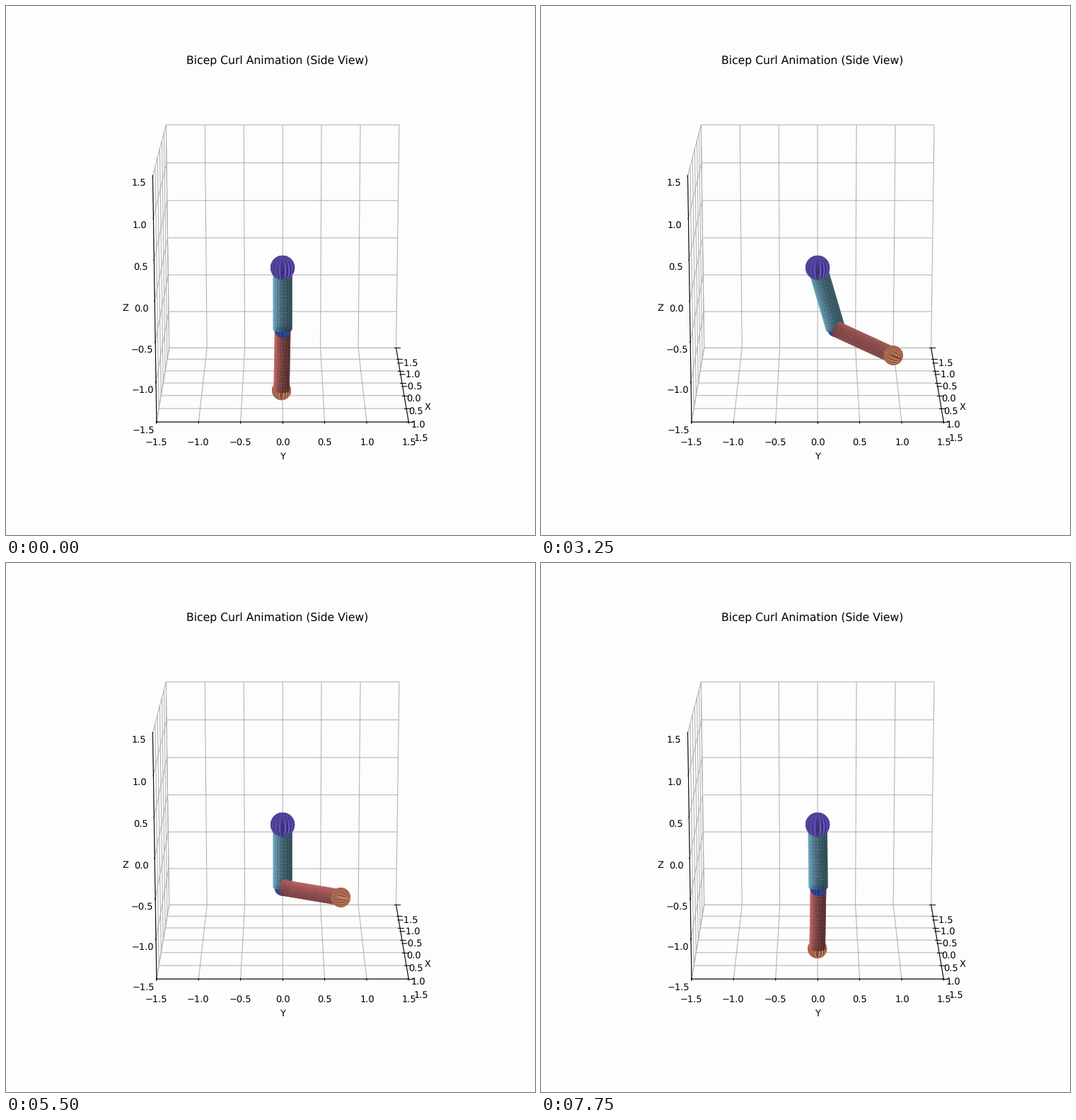
These frames come from a looping animation (748 by 748 pixels, 8000 ms). A matplotlib script:

```python
import numpy as np
import matplotlib.pyplot as plt
from matplotlib.animation import FuncAnimation

plt.rcParams["text.hinting"] = "none"

FRAMES, INTERVAL = 32, 250
LENGTH = 0.8
ALPHA = 0.92
BACKDROP = "#fdfdfd"

# upper arm: eased between a few steps
STEPS = (0, 5, 9, 13, 18, 22, 24, 27, 31)
LEAN_FRONT = (0, 0.05, 0.12, 0.125, 0.075, 0.07, 0.27, 0.3125, 0.075)
LEAN_SIDE = (0, 0.06, 0.37, 0.28, 0.045, 0, 0.2, 0.21, 0.01)
# forearm curls: peak angle in degrees, step of the peak, half width
CURLS = ((84, 14, 4), (103, 22.7, 3), (115, 28.6, 2.4))


def ease(step, values):
    i = min(np.searchsorted(STEPS, step, side="right"), len(STEPS) - 1)
    t = (step - STEPS[i - 1]) / (STEPS[i] - STEPS[i - 1])
    return values[i - 1] + (values[i] - values[i - 1]) * t * t * (3 - 2 * t)


def bump(x):
    return np.cos(np.pi / 2 * np.clip(x, -1, 1)) ** 2


def pose(step):
    """Unit directions of the upper arm and the forearm."""
    x, y = ease(step, LEAN_FRONT), ease(step, LEAN_SIDE)
    upper = np.array([x, y, -np.sqrt(1 - x * x - y * y)])
    curl = np.radians(sum(h * bump((step - c) / w) for h, c, w in CURLS) - 1)
    turn = np.radians(20 + 0.75 * (step - 13))
    fore = np.array([np.sin(curl) * np.sin(turn),
                     np.sin(curl) * np.cos(turn), -np.cos(curl)])
    return upper, fore


def turn_from_down(d):
    """Smallest rotation that takes straight down to d."""
    a, b, c = np.cross(DOWN, d)
    k = np.array([[0, -c, b], [c, 0, -a], [-b, a, 0]])
    return np.eye(3) + k + k @ k / (1 + DOWN @ d)


def place(points, d, origin):
    moved = np.einsum("ij,jmn->imn", turn_from_down(d), points)
    return moved + np.reshape(origin, (3, 1, 1))


def sphere(radius):
    # v runs a full turn: two interleaved skins make the ribs
    u, v = np.meshgrid(np.linspace(0, 2 * np.pi, 20),
                       np.linspace(0, 2 * np.pi, 41))
    return radius * np.array([np.cos(u) * np.sin(v),
                              np.sin(u) * np.sin(v), np.cos(v)])


def cylinder(radius):
    a, z = np.meshgrid(np.linspace(0, 2 * np.pi, 20),
                       np.linspace(-LENGTH, 0, 20))
    return np.array([radius * np.cos(a), radius * np.sin(a), z])


DOWN = np.array([0, 0, -1.0])
SHOULDER, ELBOW, HAND = sphere(0.15), sphere(0.1), sphere(0.12)
UPPER, FORE = cylinder(0.12), cylinder(0.1)

fig = plt.figure(figsize=(8, 8), dpi=93.5, facecolor=BACKDROP)
ax = fig.add_subplot(projection="3d", facecolor=BACKDROP)
ax.set(xlim=(-1.5, 1.5), ylim=(-1.5, 1.5), zlim=(-1.5, 1.5),
       xlabel="X", ylabel="Y", zlabel="Z")
ax.set_title("Bicep Curl Animation (Side View)")
ax.set_box_aspect((1, 1, 1))
# the tiny azimuth keeps the side wall on the left
ax.view_init(elev=15, azim=1e-4)
for axis in (ax.xaxis, ax.yaxis, ax.zaxis):
    axis.set_pane_color((1, 1, 1, 0))

parts = []


def update(step):
    while parts:
        parts.pop().remove()
    upper, fore = pose(step)
    shoulder = np.zeros(3)
    elbow = LENGTH * upper
    hand = elbow + LENGTH * fore
    for points, d, at, color in (
        (SHOULDER, DOWN, shoulder, "mediumslateblue"),
        (UPPER, upper, shoulder, "skyblue"),
        (ELBOW, upper, elbow, "royalblue"),
        (FORE, fore, elbow, "lightcoral"),
        (HAND, fore, hand, "lightsalmon"),
    ):
        parts.append(ax.plot_surface(*place(points, d, at),
                                     color=color, alpha=ALPHA))
    return parts


anim = FuncAnimation(fig, update, frames=FRAMES, interval=INTERVAL,
                     init_func=lambda: update(0), repeat=True,
                     repeat_delay=0, blit=False)
plt.show()
```
